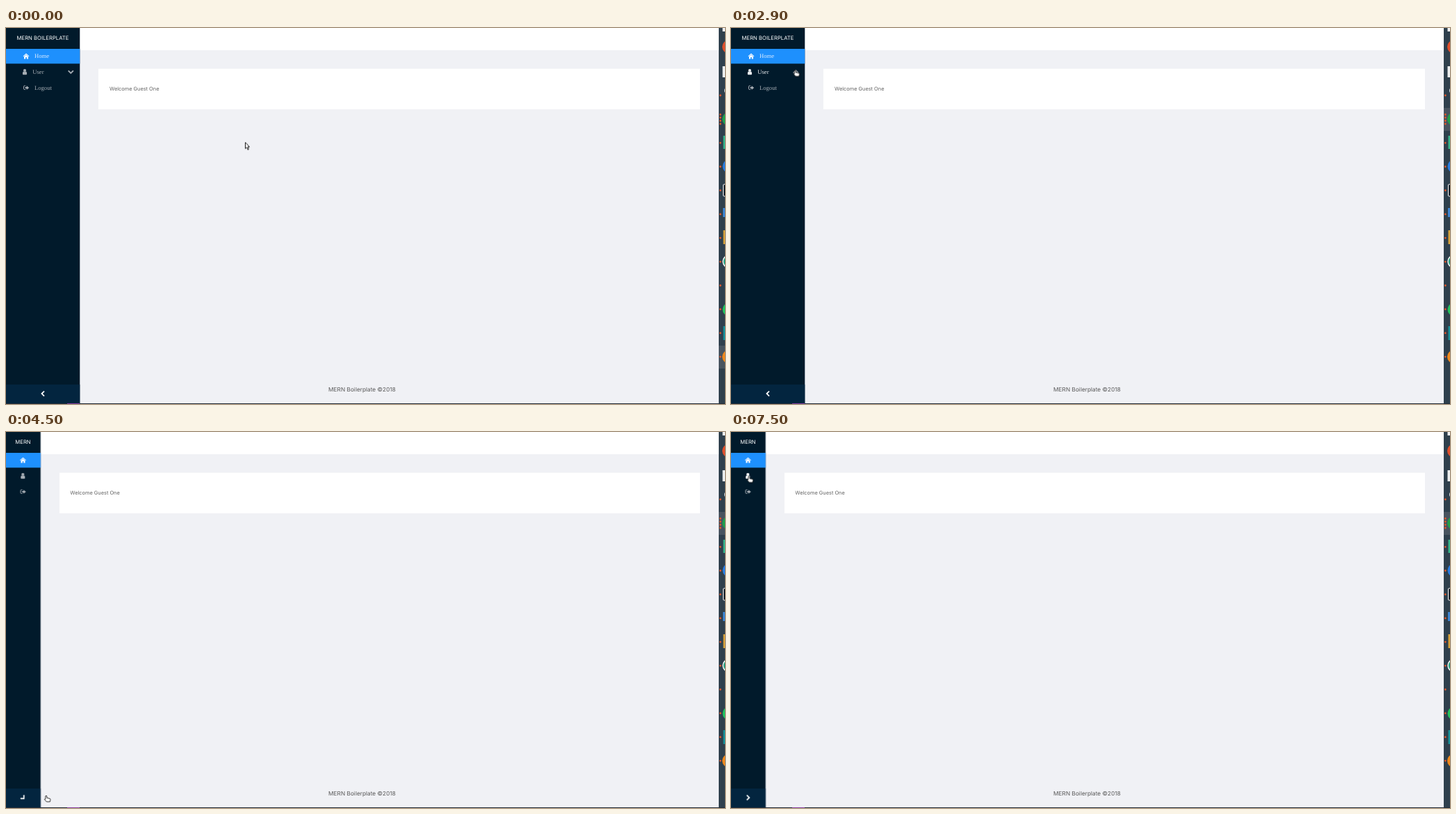
Recreate the animation shown at these times as an HTML page. Size 1035 by 541 pixels, loop 8000 ms.

```html
<!DOCTYPE html>
<html lang="en">
<head>
<meta charset="utf-8">
<title>Admin dashboard</title>
<style>
html, body { margin: 0; width: 100%; height: 100%; overflow: hidden; background: #f0f1f5; }
#stage { display: block; width: 1035px; height: 541px; }
text { font: 8.6px "Liberation Serif", serif; fill: #a6adb4; text-rendering: geometricPrecision; }
text.sans { font: 7.4px Inter, sans-serif; fill: #666; }
text.title { font-size: 7.7px; fill: #fff; text-anchor: middle; }
text.foot { font-size: 8.3px; fill: #595959; text-anchor: middle; }
.icon { fill: #a6adb4; }
.line { fill: none; stroke: #a6adb4; }
.white { fill: #fff; }
.spin { transform-box: fill-box; transform-origin: center; }

/* 100 ms = 1.25% of the loop */
.fold, .wide, .narrow, .turn, .flip, .sub, .push, .popup, .hover, .focus, .cursor, .arrow, .hand {
  animation: 8s step-end infinite;
}

/* Sidebar collapse */
.fold { animation-name: fold; }
@keyframes fold {
  0% { transform: none; }
  55% { transform: none; animation-timing-function: steps(2, start); }
  57.5%, 100% { transform: translateX(var(--dx)); }
}
.wide { animation-name: wide; }
@keyframes wide { 0% { opacity: 1; } 55%, 100% { opacity: 0; } }
.narrow { animation-name: narrow; }
@keyframes narrow { 0% { opacity: 0; } 55%, 100% { opacity: 1; } }
.turn { animation-name: turn; }
@keyframes turn {
  0% { transform: rotate(0); }
  55% { transform: rotate(-60deg); }
  56.25% { transform: rotate(-135deg); }
  57.5% { transform: rotate(-168deg); }
  58.75%, 100% { transform: rotate(-180deg); }
}

/* Submenu */
.sub { animation-name: sub; }
@keyframes sub {
  0% { height: 0; }
  16.25% { height: 0; animation-timing-function: steps(3, start); }
  20% { height: 43px; }
  36.25%, 100% { height: 0; }
}
.push { animation-name: push; }
@keyframes push {
  0% { transform: none; }
  16.25% { transform: none; animation-timing-function: steps(3, start); }
  20% { transform: translateY(42.7px); }
  36.25%, 100% { transform: none; }
}
.flip { animation-name: flip; }
@keyframes flip {
  0% { transform: none; }
  16.25% { transform: none; animation-timing-function: steps(3, start); }
  20% { transform: scaleY(-1); }
  40%, 100% { transform: none; }
}
.popup { animation-name: popup; }
@keyframes popup {
  0% { opacity: 0; }
  75% { opacity: .5; }
  76.25% { opacity: 1; }
  93.75%, 100% { opacity: 0; }
}
.hover { animation-name: hover; }
@keyframes hover {
  0% { fill: #a6adb4; }
  13.75% { fill: #e8ebee; }
  41.25% { fill: #a6adb4; }
  70%, 100% { fill: #fff; }
}
.focus { animation-name: focus; }
@keyframes focus {
  0% { transform: translateY(457px); }
  17.5%, 100% { transform: translateY(115px); }
}

/* Pointer */
.cursor { animation-name: cursor; }
@keyframes cursor {
  0% { transform: translate(344px, 164.5px); }
  2.5% { transform: translate(343px, 164.5px); }
  5% { transform: translate(343px, 164.5px); animation-timing-function: steps(4, start); }
  10% { transform: translate(150px, 84px); animation-timing-function: steps(4, start); }
  15% { transform: translate(92.5px, 60.5px); }
  40% { transform: translate(92.5px, 60.5px); animation-timing-function: steps(3, start); }
  43.75% { transform: translate(80px, 220px); animation-timing-function: steps(4, start); }
  48.75% { transform: translate(57.5px, 522.5px); }
  55% { transform: translate(57.8px, 523px); }
  61.25% { transform: translate(57.8px, 523px); animation-timing-function: steps(7, start); }
  70% { transform: translate(26.7px, 70px); animation-timing-function: steps(2, start); }
  72.5%, 100% { transform: translate(25.7px, 63.5px); }
}
.arrow { animation-name: arrow; }
@keyframes arrow {
  0%, 41.25%, 61.25% { opacity: 1; }
  13.75%, 47.5%, 67.5%, 100% { opacity: 0; }
}
.hand { animation-name: hand; }
@keyframes hand {
  0%, 41.25%, 61.25% { opacity: 0; }
  13.75%, 47.5%, 67.5%, 100% { opacity: 1; }
}
</style>
</head>
<body>
<svg id="stage" viewBox="0 0 1035 541">
  <defs>
    <g id="links">
      <text x="34" y="13.8">Profile</text>
      <text x="34" y="35">Settings</text>
    </g>
  </defs>

  <!-- Page -->
  <rect width="1035" height="541" fill="#f0f1f5"/>
  <rect width="1026" height="32" fill="#fff"/>
  <rect y="58.7" width="999" height="58.3" fill="#fff"/>
  <text class="sans foot" x="512.5" y="523.4">MERN Boilerplate ©2018</text>
  <text class="sans fold" style="--dx:-56.7px" x="149" y="90.3">Welcome Guest One</text>

  <!-- Sidebar -->
  <g class="fold" style="--dx:-56.5px">
    <rect x="106" y="58" width="27" height="60" fill="#f0f1f5"/>
    <rect width="106.3" height="541" fill="#011a2b"/>
    <rect y="30" width="106.3" height="21.3" fill="#1e90fd"/>
    <rect y="513" width="106.3" height="28" fill="#03253f"/>
  </g>
  <text class="sans title wide" x="53" y="16.5">MERN BOILERPLATE</text>
  <text class="sans title narrow" x="24.5" y="16.5">MERN</text>

  <g class="fold" style="--dx:-4.5px">
    <path class="white" d="M29 36.6l4.4 3.9-.6.7L29 37.9l-3.8 3.3-.6-.7zM26 41.2l3-2.6 3 2.6v3.2h-2.2v-2.3h-1.6v2.3H26z"/>
  </g>
  <g class="fold" style="--dx:-2.7px">
    <g class="icon hover">
      <circle cx="27" cy="61" r="2.1"/>
      <path d="M23.9 66q0-3.4 1.7-3.4 1.4 1 2.8 0 1.7 0 1.7 3.4 0 1.2-1.1 1.2h-4q-1.1 0-1.1-1.2z"/>
    </g>
  </g>
  <g class="push">
    <g class="fold" style="--dx:-4.5px">
      <path class="line" d="M28 83.2h-1.5q-1 0-1 1v3.3q0 1 1 1H28"/>
      <path class="icon" d="M27.6 84.9h2v-2l3.6 3-3.6 3v-2h-2z"/>
    </g>
    <text class="wide" x="41" y="88.8">Logout</text>
  </g>
  <g class="wide">
    <text x="41" y="43.4" style="fill:#dcecff">Home</text>
    <text class="hover" x="38.3" y="66.2">User</text>
    <path class="line spin flip" stroke-width="1.8" d="M89.7 61.3l3.6 3.6 3.6-3.6"/>
    <svg class="sub" y="75" width="106.3" height="0">
      <rect width="107" height="43" fill="#00101a"/>
      <use href="#links"/>
    </svg>
  </g>
  <g class="fold" style="--dx:-28.7px">
    <path class="spin turn" fill="none" stroke="#fff" stroke-width="1.8" d="M55 522.6l-3.5 3.5 3.5 3.5"/>
  </g>

  <g class="popup">
    <rect x="55" y="75.3" width="107" height="42.7" fill="#00101a"/>
    <use href="#links" x="56" y="75"/>
  </g>

  <!-- Dock -->
  <g>
    <rect x="1026" width="9" height="541" fill="#2f404d"/>
    <rect class="focus" x="1026" width="9" height="33" fill="#48545f"/>
    <rect x="1031.5" y="-4" width="8" height="9" fill="#f2f2f2"/>
    <circle cx="1041" cy="27" r="10" fill="#e0502c"/>
    <rect x="1031.5" y="55" width="8" height="16" fill="#eef0f0"/>
    <circle cx="1038" cy="90" r="4" fill="#dfe3e6"/>
    <circle cx="1041" cy="131" r="10" fill="#1fa04b"/>
    <rect x="1032.5" y="155" width="8" height="19" fill="#35b58a"/>
    <circle cx="1041" cy="199" r="9.5" fill="#2a7de1"/>
    <rect x="1032.5" y="225" width="10" height="17" rx="1" fill="#16212b" stroke="#fff"/>
    <rect x="1032" y="259" width="8" height="13" fill="#3d83d0"/>
    <rect x="1032.5" y="291" width="8" height="20" fill="#d7a13a"/>
    <circle cx="1041" cy="336" r="9" fill="#26a17f" stroke="#f1f5f4" stroke-width="1.5"/>
    <circle cx="1041" cy="405" r="9.5" fill="#22c35e"/>
    <rect x="1032.5" y="429" width="8" height="20" fill="#16919a"/>
    <circle cx="1041" cy="473" r="10" fill="#f08a1d"/>
    <path fill="none" stroke="#e2572b" stroke-width="2.8" stroke-linecap="round"
      d="M1028.3 97h0m0 27.5h0m0 4.5h0m0 4.5h0m0 4.5h0m0 27.3h0m0 34.2h0m0 34.2h0m0 34.2h0m0 34.2h0m0 34.2h0m0 34.2h0m0 34.2h0m0 34.2h0m0 34.2h0"/>
  </g>
  <rect y="540" width="1035" height="1" fill="#222c38"/>
  <rect x="88" y="540" width="18" height="1" fill="#8a3fa0"/>

  <g class="cursor" fill="#fff" stroke="#000" stroke-linejoin="round">
    <path class="arrow" stroke-width=".9" d="M.5 0v9l2-1.8 1.6 3.5 1.4-.7L4 6.7h2.6z"/>
    <path class="hand" stroke-width=".8" d="M-1 .9q1-1.5 2 0v2.6l4 .8q1.1.3 1.1 1.5L5.5 9h-5l-2.9-3.3q.1-1.2 1.4-.5z"/>
  </g>
</svg>
</body>
</html>
```
